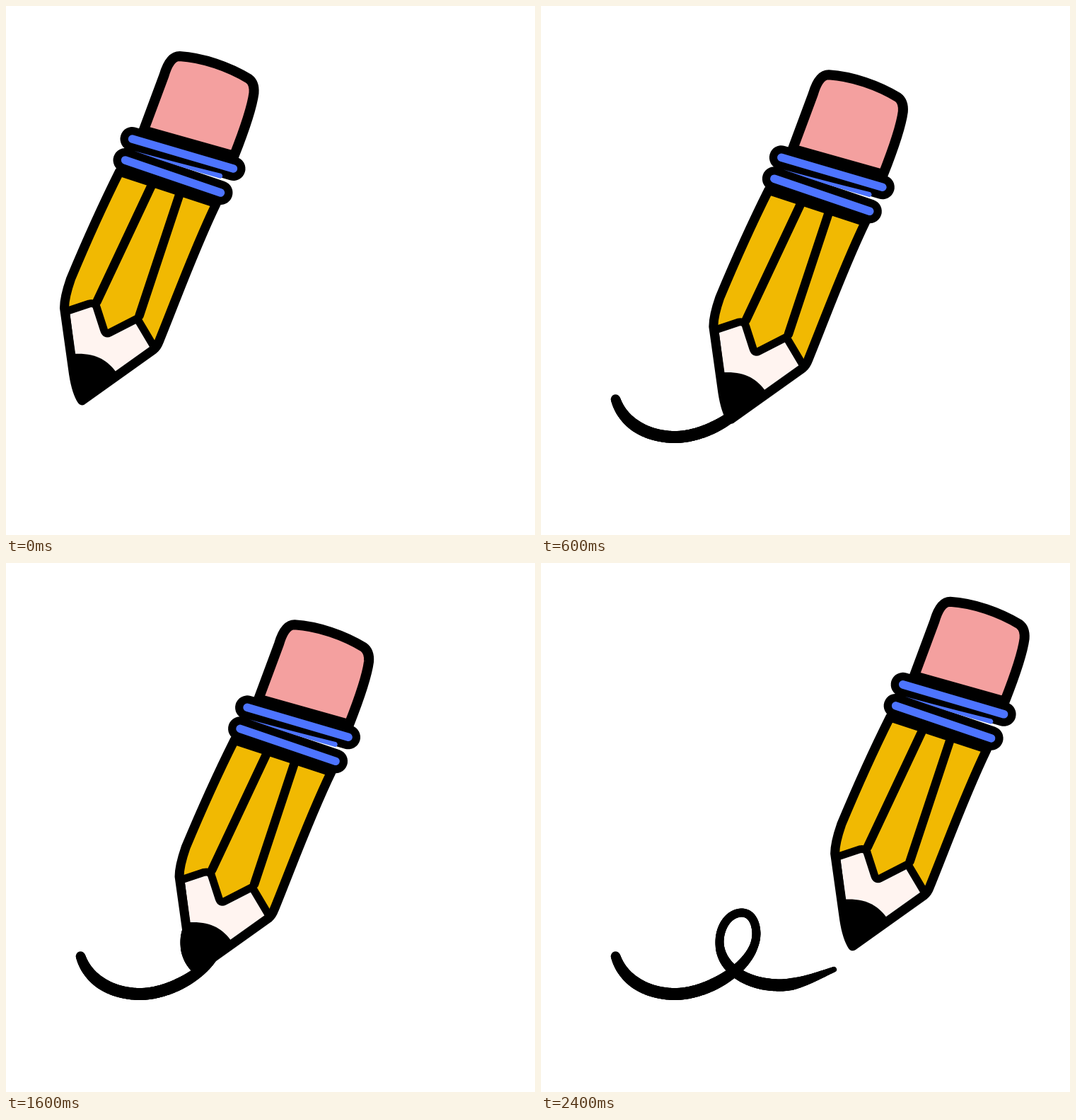
An HTML page with a canvas that plays this animation: 748x748 px, repeating every 2.6 s.

```html
<!DOCTYPE html>
<html lang="en">
<head>
<meta charset="utf-8">
<title>Pencil drawing a loop</title>
<style>
  html, body { margin: 0; width: 100%; height: 100%; overflow: hidden; background: #fff; }
  canvas { display: block; }
</style>
</head>
<body>
<canvas id="stage" width="748" height="748"></canvas>
<script>
const ctx = document.getElementById('stage').getContext('2d');
ctx.lineCap = ctx.lineJoin = 'round';

const STEP = 200;
const BLACK = '#000', YELLOW = '#f1b902', BLUE = '#4d74ff', PINK = '#f4a09f', WOOD = '#fff4f0';

// Distance the pencil has travelled at each step; the last one runs past the line
const travel = [0, 70, 141, 190, 247, 302, 334, 369, 400, 445, 487, 553, 599];

const line = document.createElementNS('http://www.w3.org/2000/svg', 'path');
line.setAttribute('d', `M105.5 556C116 590 150 609.5 190 609.5C236 609.5 304 570 304.5 524
  C304 506 296 494.5 284 494.5C266 494.5 252.5 514 252.5 536
  C252.5 572 290 597 338 597C364 597 390 584 416 574`);
const lineLength = line.getTotalLength();

// The line swells in its low parts and tapers off at the end
function inkWidth(y, s) {
  const swell = Math.max(0, Math.min(1, (y - 540) / 55));
  const taper = Math.min(1, 0.5 + (lineLength - s) / 130);
  return (12 + 5 * swell) * taper;
}

function drawInk(end) {
  ctx.strokeStyle = BLACK;
  let from = line.getPointAtLength(0);
  for (let s = 2; s <= end; s += 2) {
    const to = line.getPointAtLength(s);
    ctx.lineWidth = inkWidth(to.y, s);
    ctx.beginPath();
    ctx.moveTo(from.x, from.y);
    ctx.lineTo(to.x, to.y);
    ctx.stroke();
    from = to;
  }
}

function shape(d, fill, width) {
  const path = new Path2D(d);
  if (fill) {
    ctx.fillStyle = fill;
    ctx.fill(path);
  }
  if (width) stroke(path, BLACK, width);
}

function stroke(path, color, width) {
  ctx.strokeStyle = color;
  ctx.lineWidth = width;
  ctx.stroke(path);
}

const barrel = 'M160 236C134 288 106 352 91 388Q82 414 82 429L95 522Q99 548 107 560' +
  'L208 488Q213 484 216 476C242 412 266 345 297 281Z';
const rings = ['M178 190L321 232', 'M168 220L303 266'].map(d => new Path2D(d));

// Drawn with the tip at (107, 567)
function drawPencil() {
  shape(barrel, YELLOW);
  shape('M84 434L117 423Q126 421 128 429L138 460Q140 467 146 464L185 444L210 486L107 560L95 522Z', WOOD, 11);
  shape('M94 494C125 492 143 502 156 521L107 560L97 530Z', BLACK);
  shape('M208 250L128 420M247 262L188 440', null, 12.5);
  shape(barrel, null, 13);
  shape('M194 178L223 100Q231 73 245 73C278 75 315 88 343 105Q351 111 350 125C347 148 335 181 322 214Z', PINK, 14);
  for (const ring of rings) stroke(ring, BLACK, 34);
  for (const ring of rings) stroke(ring, BLUE, 11.5);
  shape('M181 207Q235 222 304 239Q308 243 303 246Q245 230 181 207Z', BLUE);
}

function draw(now) {
  const s = travel[Math.floor(now / STEP) % travel.length];
  const pen = line.getPointAtLength(s);
  const lift = Math.max(0, s - lineLength);
  ctx.fillStyle = '#fff';
  ctx.fillRect(0, 0, 748, 748);
  drawInk(Math.min(s, lineLength));
  ctx.save();
  ctx.translate(pen.x + lift * 0.55 - 105, pen.y - lift * 0.83 - 558);
  drawPencil();
  ctx.restore();
  requestAnimationFrame(draw);
}

draw(performance.now());
</script>
</body>
</html>
```
